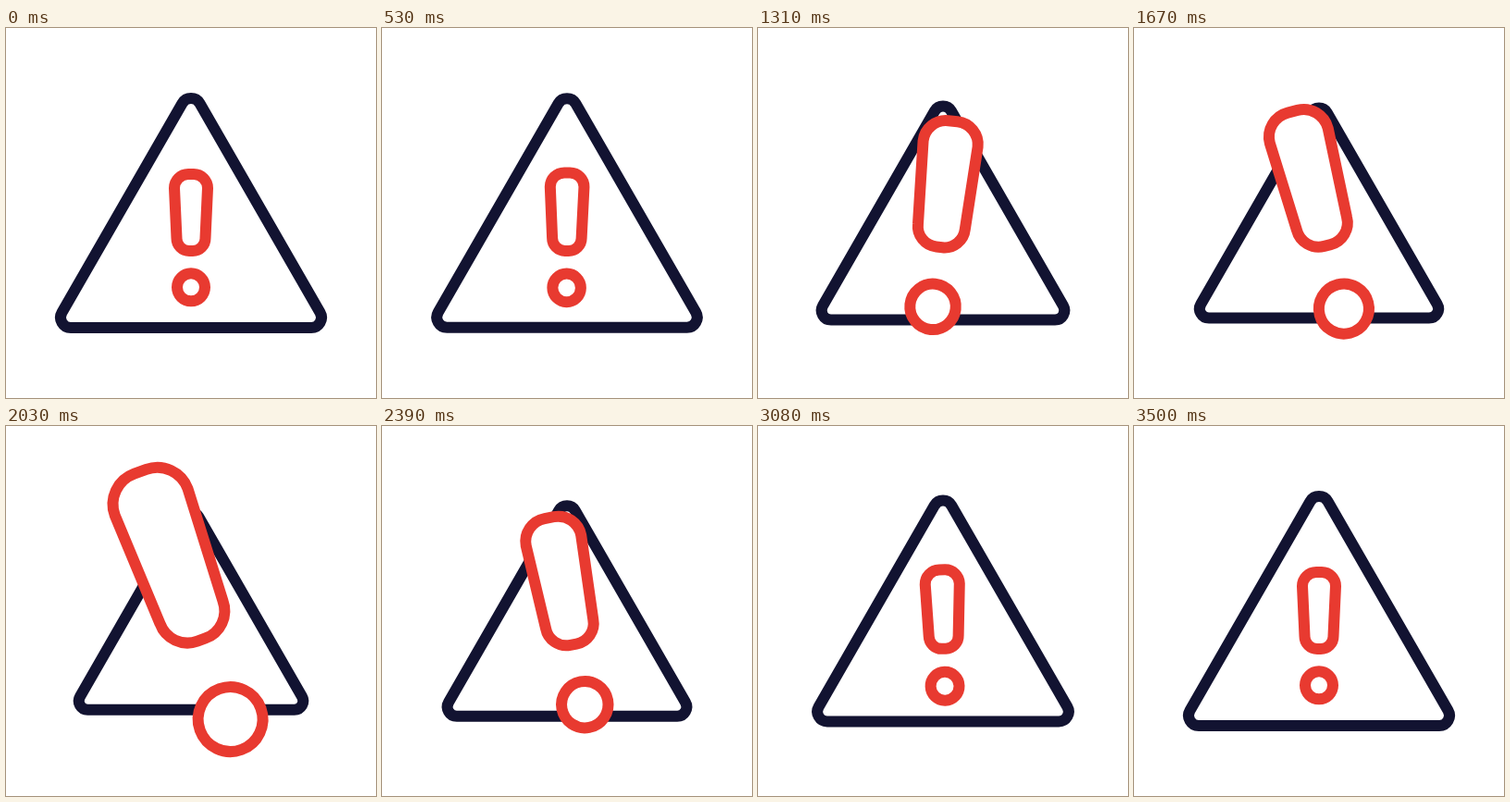
Recreate the animation shown at these times as an HTML page. Size 400 px wide and 400 px high, loop 3.53 s.

```html
<!DOCTYPE html>
<html lang="en">
<head>
<meta charset="utf-8">
<title>Warning sign</title>
<style>
  html, body { margin: 0; width: 100%; height: 100%; overflow: hidden; background: #fff; }
  svg { display: block; width: 100%; height: 100%; }
  path, circle { fill: #fff; stroke-width: 12; vector-effect: non-scaling-stroke; }
  #sign { stroke: #121331; }
  #mark { stroke: #e83a30; }
</style>
</head>
<body>
<svg viewBox="0 0 400 400">
  <path id="sign" d="M-9.5-118.5A11 11 0 0 1 9.5-118.5L139.5 107.5A11 11 0 0 1 130 124H-130A11 11 0 0 1-139.5 107.5Z"/>
  <g id="mark">
    <path d="M-18-27a15 15 0 0 1 15-15h6a15 15 0 0 1 15 15l-2.5 54.5a13.5 13.5 0 0 1-13.5 13.5h-4a13.5 13.5 0 0 1-13.5-13.5z"/>
    <circle cy="80.3" r="15"/>
  </g>
</svg>
<script>
  const LOOP = 3530, STEP = 30;
  const START = 500, PEAK = 910, DIP = 1470, SECOND_PEAK = 1950, SETTLE = 2700, REBOUND = 3100, END = 3500;

  const sign = document.getElementById('sign');
  const mark = document.getElementById('mark');

  // Smooth step from 0 to 1 between two times.
  function ramp(t, from, to) {
    const u = Math.min(1, Math.max(0, (t - from) / (to - from)));
    return (1 - Math.cos(Math.PI * u)) / 2;
  }

  // Two swells with a partial dip between them.
  const swell = (t, release) =>
    ramp(t, START, PEAK)
    - 0.63 * (ramp(t, PEAK, DIP) - ramp(t, DIP, SECOND_PEAK))
    - ramp(t, release, SETTLE);

  // Left, then right, then upright.
  const swing = (t, release) =>
    ramp(t, START, PEAK) - 2 * ramp(t, PEAK, SECOND_PEAK - 40) + ramp(t, release, SETTLE);

  // Overshoot and rebound after the release.
  const recoil = (t, release) =>
    ramp(t, release, SETTLE) - 1.3 * ramp(t, SETTLE, REBOUND) + 0.3 * ramp(t, REBOUND, END);

  function draw(now) {
    // Poses advance in even steps after the opening rest.
    const time = now % LOOP;
    const t = START + Math.max(0, Math.floor((time - START) / STEP)) * STEP;

    const signSize = 1 - 0.14 * swell(t, 2253) + 0.126 * recoil(t, 2253);
    const markSize = 1 + 1.33 * swell(t, 2115) - 0.1 * recoil(t, 2115);
    const angle = 20 * swing(t, 2170) + 5 * recoil(t, 2170);
    const lift = 47 * Math.max(0, markSize - 1);

    sign.setAttribute('transform', `translate(200 200) scale(${signSize})`);
    mark.setAttribute('transform',
      `translate(200 200) rotate(${angle}) translate(0 ${-lift}) scale(${markSize})`);
  }

  const begin = performance.now();
  function tick() {
    draw(performance.now() - begin);
    requestAnimationFrame(tick);
  }
  tick();
</script>
</body>
</html>
```
